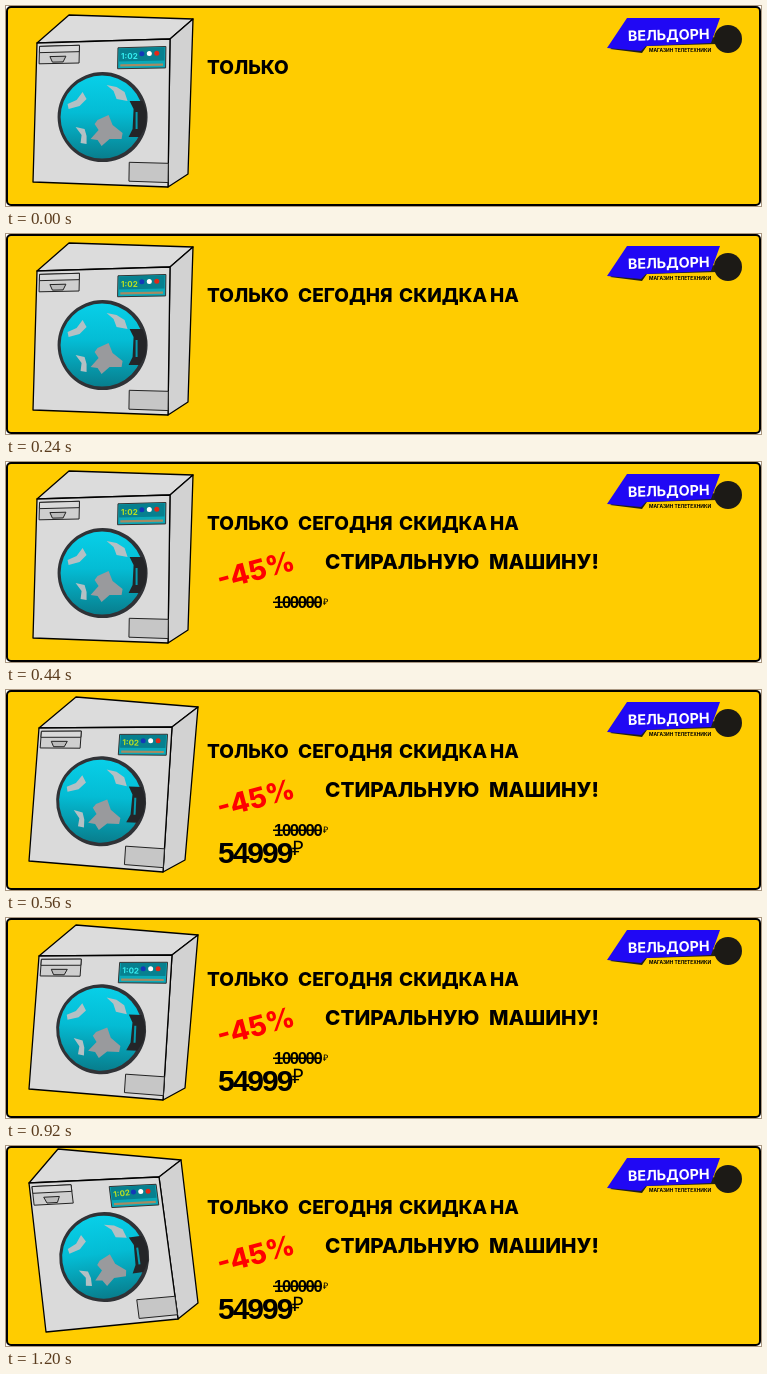
These frames come from a looping animation (755x200 px, 1280 ms). An HTML page with a canvas:

```html
<!DOCTYPE html>
<html lang="ru">
<meta charset="utf-8">
<style>
  html, body { margin: 0; width: 100%; height: 100%; overflow: hidden; background: #fff; }
  canvas { display: block; }
</style>
<canvas id="stage" width="755" height="200"></canvas>
<script>
const ctx = document.getElementById('stage').getContext('2d');
const LOOP = 1280, STEP = 70, LAST = 17;
const HEAD = 'Inter, sans-serif', PRICE = '"Liberation Sans", sans-serif';

// Cabinet corners: front TL, TR, BR, BL, then back TL, TR, BR
const POSES = {
  A: [[31, 37], [164, 33], [162, 181], [27, 176], [63, 9], [187, 13], [182, 168]],
  B: [[34, 36], [163, 46], [159, 188], [26, 180], [64, 15], [190, 21], [181, 178]],
  C: [[25, 35], [157, 46], [150, 188], [15, 180], [57, 10], [182, 22], [171, 178]],
  D: [[33, 38], [166, 37], [157, 182], [23, 171], [70, 7], [192, 17], [179, 170]],
  E: [[23, 37], [153, 31], [172, 173], [40, 186], [52, 3], [175, 14], [192, 157]]
};
const SHAKE = 'ABBACCADDEDEEDEDDE';

// text, x, baseline, size, first step
const WORDS = [
  ['ТОЛЬКО', 201, 68, 19, 0], ['СЕГОДНЯ', 292, 68, 19, 1],
  ['СКИДКА', 393, 68, 19, 2], ['НА', 484, 68, 19, 3],
  ['СТИРАЛЬНУЮ', 319, 107, 20.7, 4], ['МАШИНУ!', 483, 107, 20.7, 4]
];

function poly(points, fill, line, width = 1) {
  ctx.beginPath();
  points.forEach(p => ctx.lineTo(...p));
  ctx.closePath();
  if (fill) { ctx.fillStyle = fill; ctx.fill(); }
  if (line) { ctx.strokeStyle = line; ctx.lineWidth = width; ctx.stroke(); }
}

function disc(x, y, r, fill) {
  ctx.beginPath();
  ctx.arc(x, y, r, 0, 2 * Math.PI);
  ctx.fillStyle = fill;
  ctx.fill();
}

function label(text, x, y, font, color = '#000', spacing = 0) {
  ctx.font = font;
  ctx.letterSpacing = spacing + 'px';
  ctx.fillStyle = color;
  ctx.fillText(text, x, y);
}

function at(x, y, angle, draw) {
  ctx.save();
  ctx.translate(x, y);
  ctx.rotate(angle);
  draw();
  ctx.restore();
}

function door() {
  const glass = ctx.createLinearGradient(0, -42, 0, 42);
  glass.addColorStop(0, '#08cfe8');
  glass.addColorStop(.45, '#04bcd4');
  glass.addColorStop(1, '#087d8c');
  disc(0, 0, 45, '#303236');
  disc(-.5, 0, 41.5, glass);
  const cloth = '#b4c0c4';
  poly([[-35, -13], [-26, -17], [-20, -25], [-16, -18], [-23, -11], [-34, -8]], cloth);
  poly([[4, -32], [14, -30], [22, -25], [25, -16], [14, -18], [11, -26]], cloth);
  poly([[-27, 10], [-18, 12], [-16, 19], [-16, 27], [-22, 26], [-21, 18]], cloth);
  poly([[-5, 3], [6, -2], [10, 8], [20, 16], [19, 22], [7, 22], [-1, 29],
        [-5, 23], [-12, 22], [-4, 13], [-8, 7]], '#999a9d');
  poly([[27, -16], [40, -16], [44, -5], [43, 10], [37, 20], [26, 20],
        [30, 12], [31, -8]], '#242528');
  poly([[33, -5], [35, -5], [35, 12], [33, 12]], '#079bad');
}

function washer(step) {
  const [tl, tr, br, bl, backL, backR, backB] = POSES[SHAKE[step]];
  const on = (u, v) => [0, 1].map(i =>
    (1 - v) * (tl[i] + (tr[i] - tl[i]) * u) + v * (bl[i] + (br[i] - bl[i]) * u));
  const box = (u, v, u2, v2, fill, line) =>
    poly([on(u, v), on(u2, v), on(u2, v2), on(u, v2)], fill, line);

  ctx.lineJoin = 'round';
  poly([tl, backL, backR, tr], '#dcdcdc', '#000', 1.3);
  poly([tr, backR, backB, br], '#d2d2d2', '#000', 1.3);
  poly([tl, tr, br, bl], '#dadada', '#000', 1.3);

  box(.02, .025, .32, .15, '#cfcfcf', '#222');
  box(.02, .025, .32, .07, '#d9d9d9', '#222');
  poly([on(.1, .1), on(.22, .1), on(.2, .14), on(.12, .14)], '#bbb', '#222');
  box(.71, .84, 1, .97, '#c6c6c6', '#222');

  box(.61, .05, .97, .195, '#0ba9b8', '#333');
  box(.62, .055, .96, .145, '#07808f');
  box(.63, .165, .95, .18, '#a58a62');
  ['#1238b8', '#fff', '#e02818'].forEach((c, i) => disc(...on(.79 + i * .056, .095), 2.5, c));

  const angle = Math.atan2(br[1] - bl[1], br[0] - bl[0]) - .037;
  at(...on(.635, .125), angle, () =>
    label('1:02', 0, 0, '700 8px ' + HEAD, step % 13 ? '#b9e021' : '#35edf0'));
  at(...on(.505, .53), angle, door);
}

function logo() {
  poly([[604, 43], [636, 47], [641, 40], [712, 38], [717, 31], [620, 34]], '#222018');
  poly([[621, 12], [714, 12], [705, 37], [640, 40], [635, 45], [601, 42]], '#2008f4');
  poly([[641, 40.5], [709, 39], [707, 47], [637, 47]], '#ffcc00');
  disc(722, 33, 14, '#1c1a16');
  at(622, 35, -.025, () => label('ВЕЛЬДОРН', 0, 0, '700 14.3px ' + HEAD, '#fff'));
  label('МАГАЗИН ТЕЛЕТЕХНИКИ', 643, 46, '700 4.8px ' + HEAD);
}

function price() {
  label('54999', 212, 173, '700 30px ' + PRICE, '#000', -2);
  label('₽', 286, 165, '20px ' + PRICE);
}

function oldPrice() {
  label('100000', 268, 146, '700 16.5px ' + PRICE, '#000', -1.3);
  label('₽', 317, 143, '9px ' + PRICE);
  ctx.fillRect(267, 139.5, 49, 1.5);
}

function draw(now) {
  const step = Math.min(LAST, Math.floor(now % LOOP / STEP));
  ctx.clearRect(0, 0, 755, 200);
  ctx.beginPath();
  ctx.roundRect(1, 1, 753, 198, 4);
  ctx.fillStyle = '#ffcc00';
  ctx.fill();
  ctx.strokeStyle = '#000';
  ctx.lineWidth = 2;
  ctx.stroke();

  washer(step);
  logo();
  for (const [text, x, y, size, from] of WORDS)
    if (step >= from) label(text, x, y, `800 ${size}px ${HEAD}`);
  if (step >= 5)
    at(214, 128, -.26, () => label('-45%', 0, 0, '800 28px ' + HEAD, '#f00'));
  if (step >= 6) oldPrice();
  if (step >= 7) price();
}

const start = performance.now();
function tick() {
  draw(performance.now() - start);
  requestAnimationFrame(tick);
}
tick();
</script>
</html>
```
